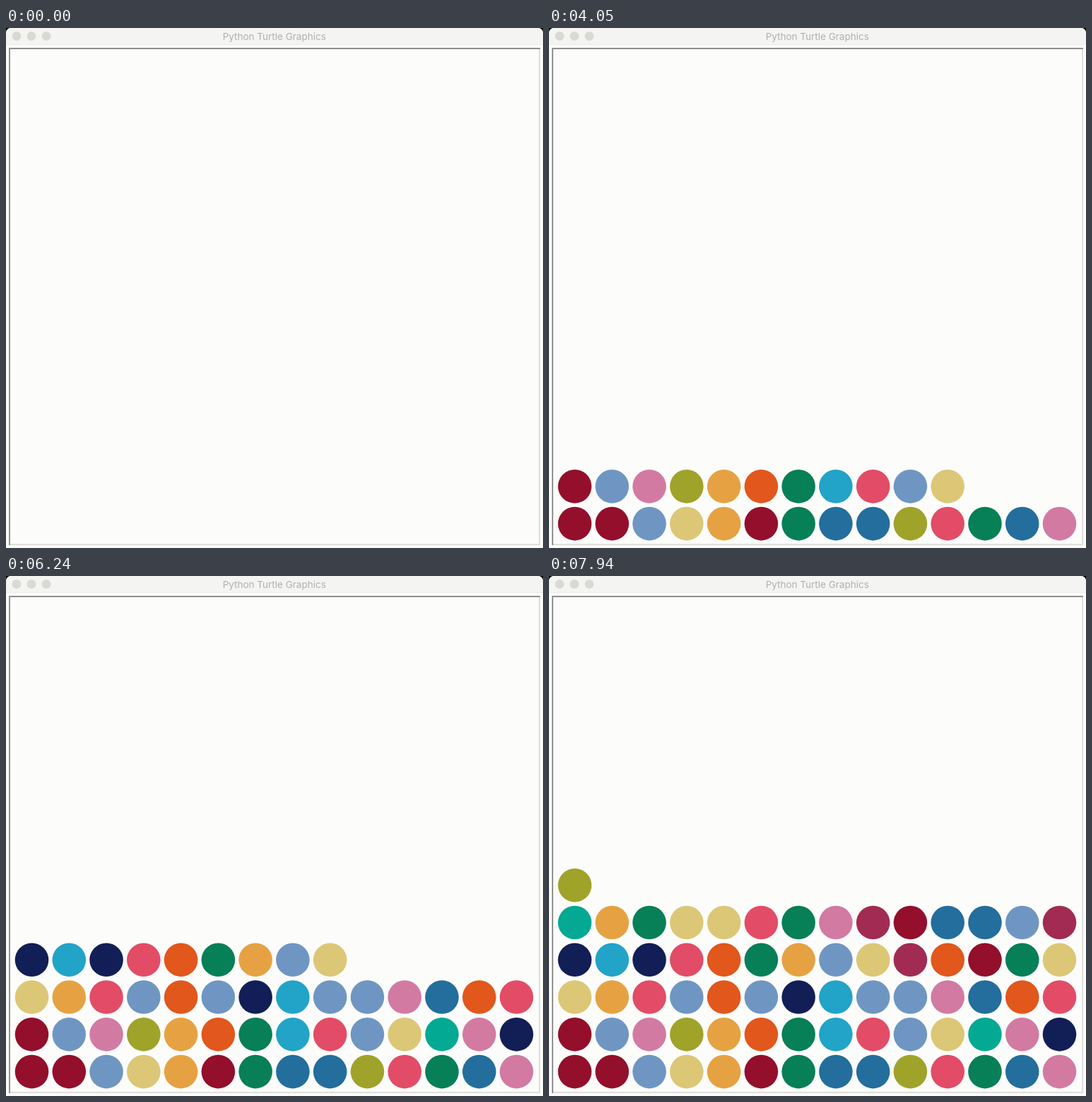
These frames come from a looping animation (760x736 px, 8 s). An HTML page with a canvas:

```html
<!DOCTYPE html>
<html lang="en">
<head>
<meta charset="utf-8">
<title>Python Turtle Graphics</title>
<style>
  html, body { margin: 0; width: 100%; height: 100%; overflow: hidden; background: #fff; }
  canvas { display: block; }
</style>
</head>
<body>
<canvas id="stage" width="760" height="736"></canvas>
<script>
const W = 760, H = 736, LOOP = 8000;
const FIRST_DOT = 1960, DOT_EVERY = 84.2;
const GAP = 52.77, RADIUS = 23.8;
const LEFT = 36.5, BOTTOM = 701.6;

const palette = {
  r: "#930f2c", // crimson
  w: "#a22b53", // wine
  h: "#e24c66", // rose
  p: "#d27aa2", // pink
  t: "#e1571c", // tangerine
  a: "#e6a242", // amber
  y: "#dcc776", // straw
  o: "#9fa32a", // olive
  g: "#077f57", // green
  m: "#03a992", // mint
  c: "#22a3c8", // cyan
  b: "#6f96c2", // light blue
  u: "#236e9c", // blue
  n: "#121e56"  // navy
};

// Rows of dots, from the bottom up.
const rows = [
  "rrbyarguuohgup",
  "rbpoatgchbympn",
  "yahbtbncbbputh",
  "ncnhtgabywtrgy",
  "magyyhgpwruubw",
  "o"
];
const columns = rows[0].length;
const dots = rows.join("");

const ctx = document.getElementById("stage").getContext("2d");

function rect(color, x, y, w, h) {
  ctx.fillStyle = color;
  ctx.fillRect(x, y, w, h);
}

function disc(color, x, y, r) {
  ctx.fillStyle = color;
  ctx.beginPath();
  ctx.arc(x, y, r, 0, Math.PI * 2);
  ctx.fill();
}

function roundTop(color, h) {
  ctx.fillStyle = color;
  ctx.beginPath();
  ctx.roundRect(0, 0, W, h, [7, 7, 0, 0]);
  ctx.fill();
}

function drawWindow() {
  rect("#000", 0, 0, W, 30);
  roundTop("#fcfcfb", H);

  // Title bar
  roundTop("#f4f4f2", 23);
  rect("#ececea", 0, 23, W, 1);
  for (const x of [15, 36, 57]) disc("#dadad4", x, 11.5, 6.5);
  ctx.font = "13.5px Inter, sans-serif";
  ctx.textAlign = "center";
  ctx.fillStyle = "#b0b0ae";
  ctx.fillText("Python Turtle Graphics", 379.7, 17);

  // Sunken drawing area
  rect("#dededc", 754, 28, 2, 704);
  rect("#dededc", 4, 730, 752, 2);
  rect("#8e8e8c", 4, 28, 752, 2);
  rect("#929290", 4, 28, 2, 704);
}

function draw(t) {
  drawWindow();
  const shown = Math.min(dots.length, Math.floor((t - FIRST_DOT) / DOT_EVERY) + 1);
  for (let i = 0; i < shown; i++) {
    const col = i % columns, row = Math.floor(i / columns);
    disc(palette[dots[i]], LEFT + col * GAP, BOTTOM - row * GAP, RADIUS);
  }
}

const start = performance.now();
function tick() {
  draw((performance.now() - start) % LOOP);
  requestAnimationFrame(tick);
}
tick();
</script>
</body>
</html>
```
